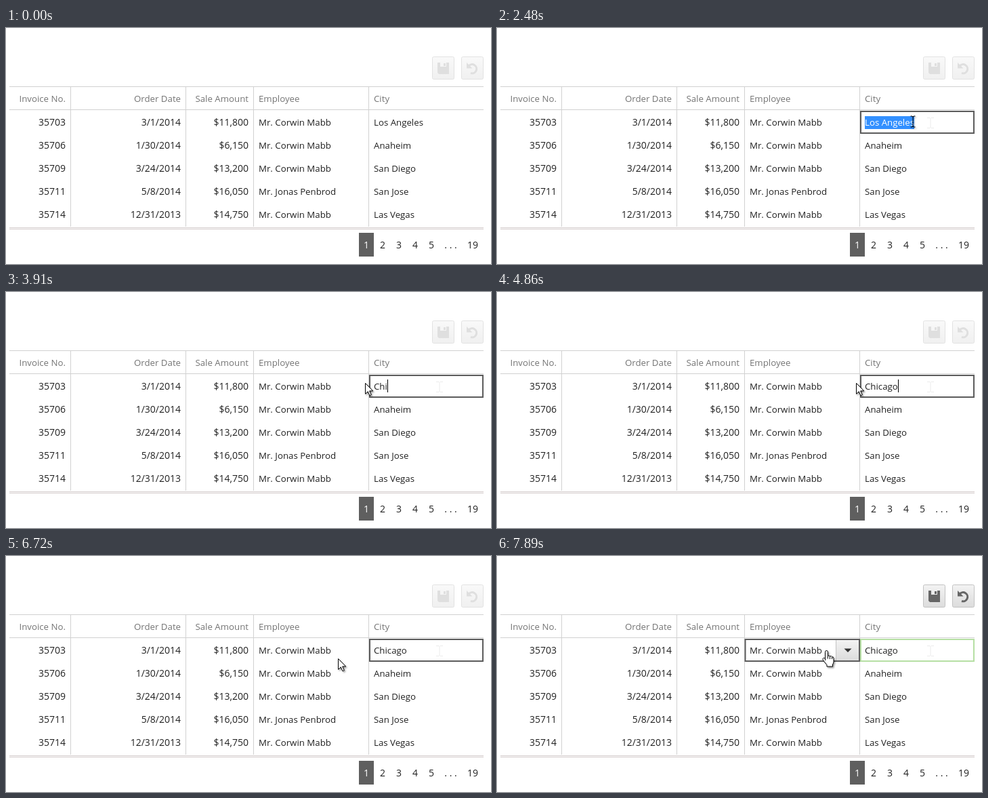
Animation of 716 by 348 pixels, one loop 7.99 s. Source, as an HTML page:

```html
<!DOCTYPE html>
<html lang="en">
<head>
<meta charset="utf-8">
<title>Editable grid</title>
<style>
  html, body { margin: 0; width: 100%; height: 100%; overflow: hidden; background: #fff; }
  svg { display: block; }
  text { font: 13.25px "Open Sans", "Noto Sans", sans-serif; fill: #222; white-space: pre; }
  .num { font-size: 14px; }
  .head { fill: #757575; }
  .end { text-anchor: end; }
  .mid { text-anchor: middle; }
  .line { fill: #d1d1d1; }
  .foot { fill: #d3cbcb; }
  .tool { color: #dfdfdf; }
  .tool .face { fill: url(#off); stroke: #e2e2e2; }
  .on .tool { color: #666; }
  .on .tool .face { fill: url(#lit); stroke: #c3c3c3; }
  .cursor path { fill: #fff; stroke: #000; stroke-linejoin: round; }
  .cursor .bare { fill: none; }
</style>
</head>
<body>
<svg id="stage" width="716" height="348" viewBox="0 0 716 348">
  <defs>
    <linearGradient id="off" x2="0" y2="1"><stop stop-color="#f9f9f9"/><stop offset="1" stop-color="#f0f0f0"/></linearGradient>
    <linearGradient id="lit" x2="0" y2="1"><stop stop-color="#f3f3f3"/><stop offset="1" stop-color="#dcdcdc"/></linearGradient>
    <filter id="drop" x="-50%" y="-30%" width="220%" height="180%">
      <feDropShadow dx="1.6" dy="1.8" stdDeviation="1" flood-opacity=".4"/>
    </filter>
  </defs>

  <g class="tool">
    <rect class="face" x="629.5" y="42.5" width="32" height="33" rx="2"/>
    <path fill="currentColor" fill-rule="evenodd" d="M637 51h17v17h-15l-2-2zM641 51v6h9v-6zM646 52h3v4h-3z"/>
  </g>
  <g class="tool">
    <rect class="face" x="672.5" y="42.5" width="32" height="33" rx="2"/>
    <path fill="none" stroke="currentColor" stroke-width="3" d="M683 56A6.6 6.6 0 1 1 686 66.5"/>
    <path fill="currentColor" d="M680 51v8.5h8.5z"/>
  </g>

  <g id="grid"></g>

  <g id="cityBox">
    <rect x="537" y="123" width="167" height="32" fill="#fff" stroke-width="2"/>
    <rect id="mark" x="543" y="130" width="73" height="19" fill="#3390ff" stroke="none"/>
  </g>
  <text id="city" x="543" y="144"></text>
  <rect id="caret" y="129" width="1" height="19" fill="#000"/>
  <path id="trace" transform="translate(640 140)" fill="none" stroke="#ebebeb"
    d="M-5-7.5h4l1 1 1-1h4M0-6.5v13M-5 7.5h4l1-1 1 1h4"/>

  <g id="picker">
    <rect x="366.5" y="123" width="168.5" height="32" fill="none" stroke="#5c5c5c" stroke-width="2"/>
    <rect x="501" y="124" width="33" height="30" fill="url(#lit)"/>
    <rect x="500" y="124" width="1" height="30" fill="#c3c3c3"/>
    <path d="M512.5 136.5h11l-5.5 5.5z" fill="#333"/>
  </g>

  <g id="cursor" class="cursor" filter="url(#drop)">
    <path data-kind="arrow" d="M.5.5v15.8l3.8-3.5 2.6 5.9 2.4-1.1-2.6-5.7h5z"/>
    <path data-kind="beam" class="bare" d="M-3.5-8h2.5l1 1 1-1h2.5M0-7v14M-3.5 8h2.5l1-1 1 1h2.5"/>
    <g data-kind="hand">
      <path d="M-2 14V1.5Q-2-.5 0-.5 1.9-.5 1.9 1.5V7.5Q3.4 6.2 5 7.8 7 6.8 8 8.7 10.5 8.2 10.5 11V15.5Q10.5 18 9 20V23H.5V20.5Q-2.5 17-5 13.7-6.5 11-4.5 10.3-3 10-2 11.8z"/>
      <path class="bare" d="M1.9 7.5v4M5 8v4M8 9v3"/>
    </g>
  </g>
</svg>
<script>
const LOOP = 7990;
const $ = id => document.getElementById(id);
const grid = $("grid");

function add(tag, attrs, label) {
  const el = document.createElementNS("http://www.w3.org/2000/svg", tag);
  for (const k in attrs) el.setAttribute(k, attrs[k]);
  if (label) el.textContent = label;
  grid.append(el);
}
const text = (x, y, label, cls = "") => add("text", { x, y, class: cls }, label);
const rect = (x, y, width, height, cls) => add("rect", { x, y, width, height, class: cls });

const columns = [[88, "end num"], [258, "end num"], [358, "end num"], [373, ""], [543, ""]];
["Invoice No.", "Order Date", "Sale Amount", "Employee", "City"].forEach((label, i) =>
  text(columns[i][0], 109, label, "head" + (i < 3 ? " end" : "")));

const seller = "Mr. Corwin Mabb";
[
  ["35703", "3/1/2014", "$11,800", seller, ""],
  ["35706", "1/30/2014", "$6,150", seller, "Anaheim"],
  ["35709", "3/24/2014", "$13,200", seller, "San Diego"],
  ["35711", "5/8/2014", "$16,050", "Mr. Jonas Penbrod", "San Jose"],
  ["35714", "12/31/2013", "$14,750", seller, "Las Vegas"]
].forEach((row, r) => row.forEach((label, i) =>
  text(columns[i][0], 144 + 34 * r, label, columns[i][1])));

rect(5, 86, 700, 1, "line");
rect(5, 120, 700, 1, "line");
for (const x of [95, 265, 365, 535]) rect(x, 87, 1, 206, "line");
rect(5, 294, 700, 1, "foot");
rect(5, 296, 700, 1, "foot");

add("rect", { x: 521, y: 302, width: 22, height: 35, fill: "#5f5f5f" });
add("text", { x: 532, y: 325, class: "mid num", style: "fill:#fff" }, "1");
[[556, "2"], [580, "3"], [604, "4"], [628, "5"], [656.5, ". . ."], [689, "19"]]
  .forEach(([x, label]) => text(x, 325, label, "mid num"));

// time, x, y
const path = [
  [930, 722, 148], [1050, 682, 143], [1150, 656, 140], [1260, 643, 138],
  [2020, 643, 138], [2021, 640, 140], [2170, 640, 140], [2810, 586, 136],
  [2840, 580, 135], [3050, 530, 134], [5790, 530, 134], [5950, 526, 135],
  [6110, 524, 136], [6270, 523, 137], [6720, 490, 151], [7020, 470, 148],
  [7120, 470, 148], [7250, 472, 140], [7370, 472, 140], [7890, 487, 140]
];
const typed = [
  [0, "Los Angeles"], [3450, "C"], [3880, "Ch"], [3910, "Chi"], [4140, "Chic"],
  [4370, "Chica"], [4400, "Chicag"], [4860, "Chicago"]
];
const caretOn = [[3450, 5360], [5860, 6360], [6860, 7120]];
const OPEN = 2020, BLUR = 7120, PICK = 7370;

function place(t) {
  const i = path.findIndex(p => p[0] > t);
  if (i === 0) return path[0].slice(1);
  if (i < 0) return path[path.length - 1].slice(1);
  const [t0, x0, y0] = path[i - 1], [t1, x1, y1] = path[i];
  const k = (t - t0) / (t1 - t0);
  return [Math.round(x0 + (x1 - x0) * k), Math.round(y0 + (y1 - y0) * k)];
}
const show = (el, on) => { el.style.display = on ? "" : "none"; };

function draw(t) {
  const editing = t >= OPEN && t < BLUR;
  const marked = editing && t < 3450;
  const city = $("city");
  const value = typed.filter(s => s[0] <= t).pop()[1];
  if (city.textContent !== value) city.textContent = value;
  city.style.fill = marked ? "#fff" : "";
  show($("cityBox"), editing || t >= PICK);
  $("cityBox").setAttribute("stroke", editing ? "#5c5c5c" : "#b6dfa4");
  show($("mark"), marked);
  show($("trace"), t >= OPEN);
  show($("picker"), t >= PICK);
  $("stage").classList.toggle("on", t >= BLUR);

  show($("caret"), caretOn.some(([a, b]) => t >= a && t < b));
  $("caret").setAttribute("x", Math.round(543 + city.getComputedTextLength()));

  const [x, y] = place(t);
  const kind = t >= BLUR ? "hand" : editing && x >= 536 ? "beam" : "arrow";
  const nudge = kind === "hand" ? -0.5 : 0;
  $("cursor").setAttribute("transform", `translate(${x + nudge} ${y})`);
  show($("cursor"), t >= 960);
  for (const el of $("cursor").children) show(el, el.dataset.kind === kind);
}

function tick() {
  draw(performance.now() % LOOP);
  requestAnimationFrame(tick);
}
tick();
</script>
</body>
</html>
```
